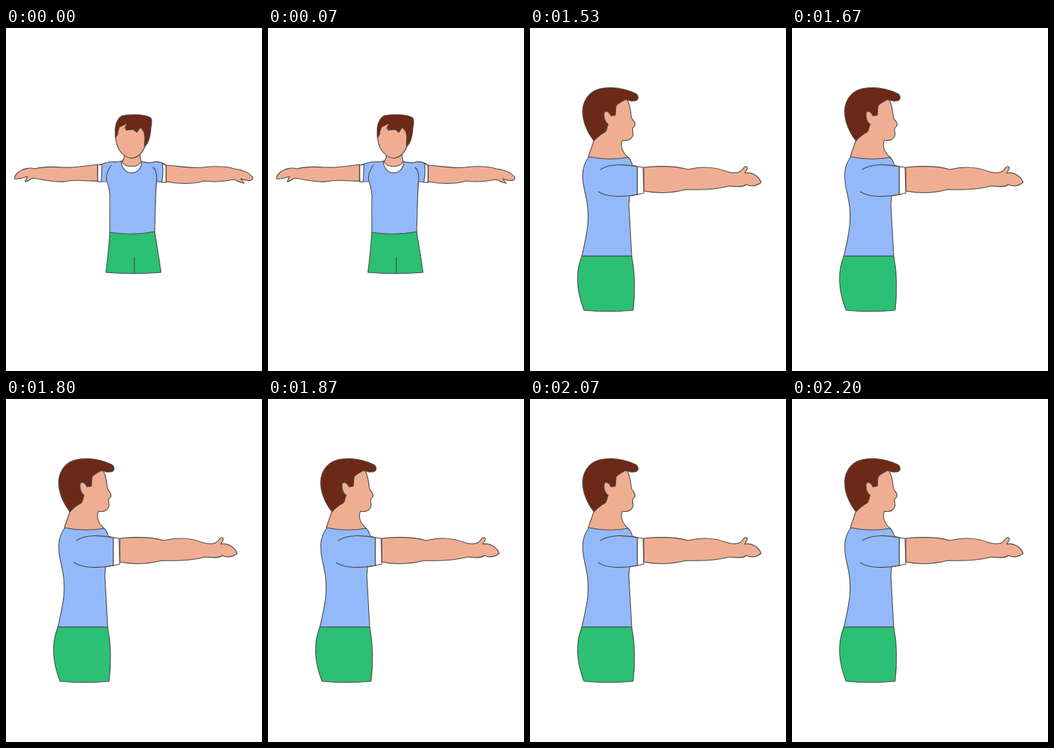
An HTML page for the animation above (3.07 s loop, 360 by 480 pixels).

```html
<!DOCTYPE html>
<html lang="en">
<head>
<meta charset="utf-8">
<title>Arms outstretched</title>
<style>
  html, body { margin: 0; width: 100%; height: 100%; overflow: hidden; background: #fff; }
  svg { display: block; width: 100%; height: 100%; }
  path { stroke: #4b4745; stroke-width: 1.1; stroke-linejoin: round; stroke-linecap: round; fill: none; }
  .skin { fill: #efae92; }
  .hair { fill: #6c2917; }
  .shirt { fill: #93b9fb; }
  .shorts { fill: #2cc074; }
  .white { fill: #fff; }
  .bare { stroke: none; }
</style>
</head>
<body>
<svg viewBox="0 0 360 480">
  <g id="front">
    <!-- arms -->
    <path class="skin" d="M129 191C114 193 98 196 80 195C66 194 51 194 41 197C32 194 22 198 17 202C13 206 11 209 12 211C17 212 23 210 30 208L27 215C31 215 34 211 38 210C51 212 66 216 82 215C98 211 114 215 129 214Z"/>
    <path class="skin" d="M225 192C242 193 261 197 277 195C294 193 311 194 321 197C333 198 343 203 347 209C348 214 341 215 330 211L335 217C330 217 325 213 320 212C306 215 292 216 279 214C262 219 242 218 225 215Z"/>
    <!-- shorts and shirt -->
    <path class="shorts" d="M146 286Q144 316 140.500 342Q179 345 218 342Q214 314 209 285Z"/>
    <path d="M180.500 321V343"/>
    <path class="shirt bare" d="M163 186C155 189 148 186 143 188L129 192V215L142 214C147 224 147 234 146 286Q178 291 209 285L211 232L213 215L225 216V192C218 187 212 186 206 188C200 190 195 187 189 187Z"/>
    <path d="M163 186C155 189 148 186 143 188L129 192V215H141M146 286Q178 291 209 285M213 215L225 216V192C218 187 212 186 206 188C200 190 195 187 189 187"/>
    <path class="white" d="M129 192L135 191L134 215H129Z"/>
    <path class="white" d="M220 190L225 192V216H219Q222 203 220 190Z"/>
    <path d="M148 192C143 199 140 208 142 215C145 223 147 230 146 241V286M207 195C212 200 213 209 211 220L209 285"/>
    <path class="white" d="M162 187C164 208 190 208 191 187Z"/>
    <path class="skin bare" d="M166 174C167 180 166 184 163 187C168 196 185 196 190 187L188 174Z"/>
    <path d="M166 176C167 181 166 184 163 187C168 196 185 196 190 187L188 177"/>
    <!-- head -->
    <path class="skin" d="M154 148C154 160 156 167 161 173C166 179 172 183 179 182C187 180 193 173 196 164L200 141L185 130L162 130Z"/>
    <path class="hair" d="M154 154C152 137 155 128 163 123C174 120 194 121 202 125C206 127 205 132 204 138C203 149 202 159 195 166C194 157 197 150 193 144L189 139L184 146L179 142L169 143L168 139L159 145Z"/>
    <path class="skin bare" d="M157 147L160 139L170 134L165 142L169 142L162 145Z"/>
  </g>
  <g id="side" visibility="hidden">
    <!-- shorts and shirt -->
    <path class="shorts" d="M73 319C64 341 65 367 76 395Q110 398 145 395C148 369 148 344 143 319Z"/>
    <path class="shirt" d="M83 180C71 195 73 213 78 233C86 266 80 288 73 319H143L139 247L140 235L151 233V194L144 192Q142 185 138 181Z"/>
    <!-- head and neck -->
    <path class="skin" d="M90 157L82 180Q110 186 138 181C131 175 126 166 130 157C138 159 144 155 145 149C145 145 143 143 145 139C148 138 149 135 146 130C142 127 142 123 142 120C141 112 140 107 137 101L120 97L95 125Z"/>
    <path class="hair" d="M90 158C80 145 74 130 74 116C75 98 86 86 104 84C121 82 137 86 149 92C154 96 153 102 145 102C141 103 138 100 134 100C128 104 124 105 121 109L120 122L114 123C111 116 104 114 104 121C104 128 106 132 110 135C107 139 110 142 105 146Q97 150 90 158Z"/>
    <!-- arm -->
    <path class="skin" d="M160 195C181 193 205 193 222 198C242 193 262 195 277 201C287 204 296 203 300 196C303 192 307 194 305 198L302 203C313 201 322 208 325 216C319 221 311 222 304 219C300 223 290 222 281 221C261 226 241 227 219 226C200 231 180 232 160 228Z"/>
    <path class="white" d="M151 194L159 195L160 231L151 233Z"/>
    <path d="M99 198C111 190 132 190 151 194M96 229C108 237 130 237 151 233"/>
  </g>
</svg>
<script>
  const LOOP = 3070, TURN = 1530;
  const front = document.getElementById('front');
  const side = document.getElementById('side');
  const start = performance.now();

  const show = (node, on) => node.setAttribute('visibility', on ? 'visible' : 'hidden');

  function draw(now) {
    const turned = Math.max(0, now - start) % LOOP >= TURN;
    show(front, !turned);
    show(side, turned);
    requestAnimationFrame(draw);
  }
  draw(start);
</script>
</body>
</html>
```
